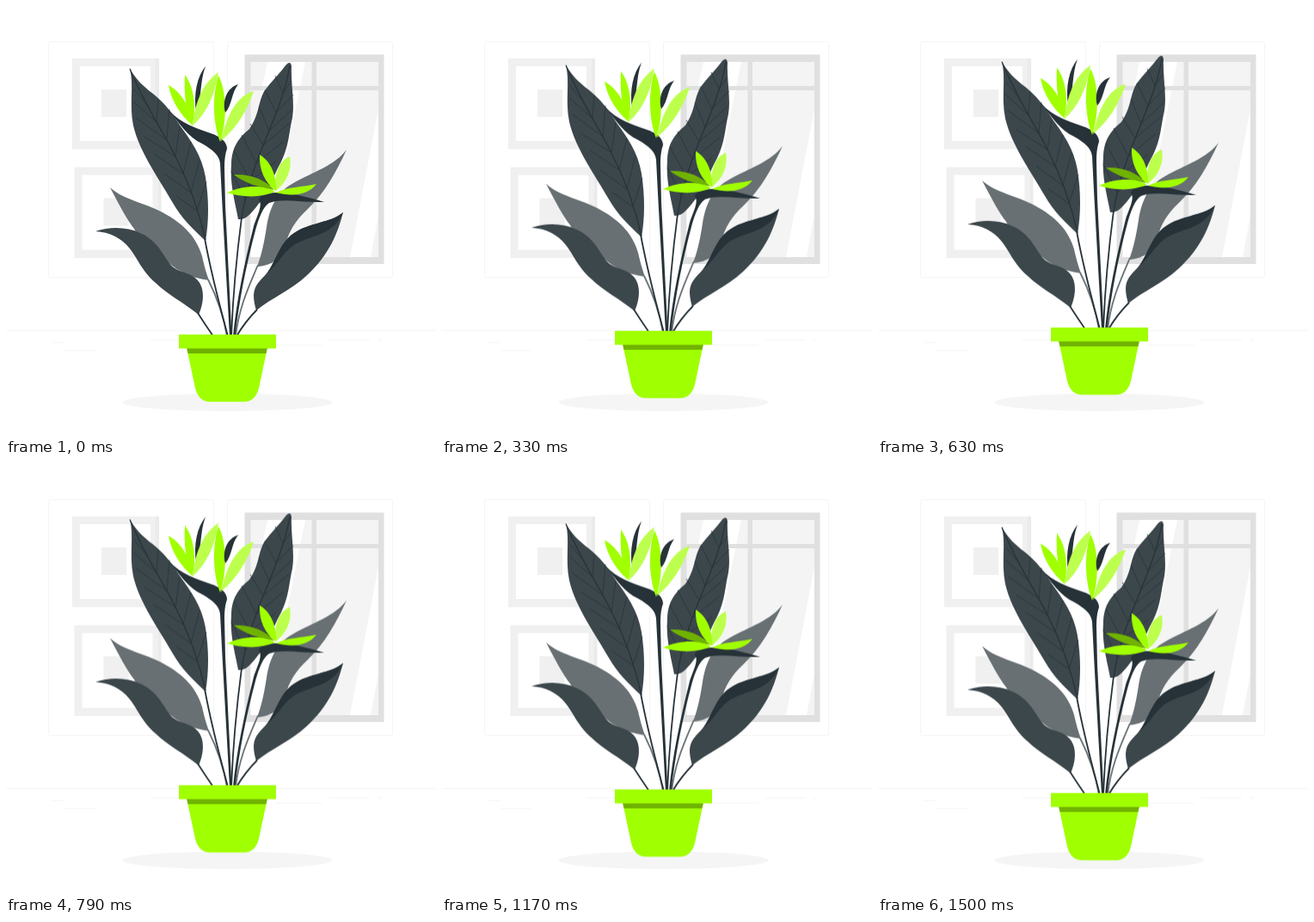
Recreate the animation shown at these times as an HTML page. Size 500x500 px, loop 1.54 s.

```html
<!DOCTYPE html>
<html lang="en">
<head>
<meta charset="utf-8">
<title>Floating plant</title>
<style>
  html, body { margin: 0; width: 100%; height: 100%; overflow: hidden; background: #fff; }
  svg { display: block; width: 100%; height: 100%; }
  .plant { animation: float 1540ms linear -46ms infinite; }
  @keyframes float {
    0%, 100% { transform: translateY(.6px); }
    50% { transform: translateY(-9.4px); }
  }
  .line { fill: none; stroke: #f5f5f5; }
  .pale { fill: #f0f0f0; }
  .leaf { fill: #3c474c; }
  .dark { fill: #263238; }
  .faded { fill: #687073; }
  .lime { fill: #a0ff00; }
  .light { fill: #bdff4d; }
  .shade { fill: #70b200; }
  .stem { fill: none; stroke: #263238; stroke-width: 1.8; }
  .back { stroke: #687073; }
  .vein { fill: none; stroke: #263238; stroke-width: .7; }
</style>
</head>
<body>
<svg viewBox="0 0 500 500">
  <defs>
    <g id="picture">
      <path class="pale" fill-rule="evenodd" d="M0 0H97V105.500H0ZM9 9V96H91V9Z"/>
      <path fill="#ebebeb" d="M97 0H101V105.500H97Z"/>
      <path class="pale" d="M34 36H63V68H34Z"/>
    </g>
  </defs>

  <!-- Room -->
  <g class="line">
    <rect x="49.500" y="41.500" width="192" height="274" rx="2"/>
    <rect x="257.500" y="41.500" width="192" height="274" rx="2"/>
    <path d="M0 377.500H500M53 391.300H68M68 400.800H104M168 388.300H201M313 394.200H368M376 388.300H423M432 388.300H436"/>
  </g>
  <use href="#picture" x="77" y="61"/>
  <use href="#picture" x="79.500" y="187.500"/>
  <path fill="#e0e0e0" d="M277.500 56.500H439.500V300H277.500Z"/>
  <path fill="#f4f4f4" d="M284.500 65H433V292H284.500Z"/>
  <path fill="#fff" d="M304 65H348L302 292H284.500V158ZM433 120V243L424 292H400Z"/>
  <path fill="#e0e0e0" d="M355.500 65H361V292H355.500ZM284.500 93H433V98H284.500Z"/>
  <ellipse cx="257.500" cy="460.800" rx="122" ry="10.200" fill="#f5f5f5"/>

  <g class="plant">
    <!-- Faded leaves -->
    <path class="faded" d="M121 211C136 225 162 229 182 240C208 254 222 270 228 291C230 300 233 311 236 319C213 316 194 306 182 291C168 278 156 274 149 259C141 249 132 232 121 211Z"/>
    <path class="faded" d="M396 167C383 185 357 193 334 206C313 217 306 238 303 257C300 276 297 290 292 303C310 302 321 292 325 279C328 262 338 248 350 237C371 217 384 193 396 167Z"/>
    <path class="stem back" d="M235 318C245 338 253 360 257 384M293 301C282 327 271 350 267 384"/>

    <!-- Tall left leaf -->
    <path class="leaf" d="M144 73C149 92 143 114 148 139C155 170 180 204 194 229C204 247 219 261 232 273C236 250 236 225 232 199C228 174 214 155 203 140C192 122 184 113 171 102C159 93 151 85 144 73Z"/>
    <path class="stem" style="stroke-width: 1.200" d="M144 73C163 119 184 148 197 175C214 208 225 241 232 272"/>
    <path class="stem" d="M231 270C239 314 249 350 258 384"/>
    <path class="vein" d="M165 116l-17-20M175 135l-27-24M187 156l-36-26M197 175l-36-23M206 195l-34-23M215 217l-31-22M222 238l-24-17M175 135l2-27M187 156l3-36M197 175l5-35M206 195l9-37M215 217l10-38M222 238l11-34"/>

    <!-- Tall right leaf -->
    <path class="leaf" d="M326 68Q331 63 332 70C331 92 336 111 333 130C329 147 329 163 320 181C309 201 305 218 293 231C284 243 278 249 270 248C267 231 260 207 262 185C262 164 271 153 283 143C295 126 293 110 301 98C309 87 318 79 326 68Z"/>
    <path class="stem" style="stroke-width: 1.200" d="M330 69C326 98 310 135 299 162C286 194 278 220 274 247"/>
    <path class="stem" d="M274 246C269 284 264 334 262 384"/>
    <path class="vein" d="M322 101l-9-20M314 124l-13-26M306 145l-12-28M299 162l-15-25M291 183l-17-33M284 203l-19-35M278 225l-16-33M322 101l10-14M314 124l20-21M306 145l27-25M299 162l31-26M291 183l32-26M284 203l30-22M278 225l25-19"/>

    <!-- Low leaves -->
    <path class="leaf" d="M104 262C122 256 141 257 156 264C175 272 181 287 190 299C197 310 214 309 222 318C232 328 230 346 224 359C207 345 187 335 174 322C157 307 153 293 143 281C134 270 121 263 104 262Z"/>
    <path class="leaf" d="M392 240C378 252 352 252 335 264C317 276 314 298 303 311C295 320 289 324 288 336C288 344 290 350 291 354C308 340 332 330 349 314C376 290 386 263 392 240Z"/>
    <path class="dark" d="M392 240C378 252 352 252 335 264C317 276 314 298 303 311C315 302 320 290 332 280C350 266 379 270 392 240Z"/>
    <path class="stem" d="M223 357Q232 371 241 384M292 353Q278 367 268 384"/>

    <!-- Pair of blooms -->
    <path class="lime" d="M189 92C200 98 214 113 217 139C204 128 192 111 189 92Z"/>
    <path class="lime" d="M208 80C217 92 222 113 217 138C208 122 207 99 208 80Z"/>
    <path class="dark" d="M232 70C222 82 218 103 221 123C228 108 225 88 232 70Z"/>
    <path class="light" d="M247 77C231 88 220 108 217 139C233 125 243 104 247 77Z"/>
    <path class="dark" d="M189 121C204 137 221 142 238 148C250 152 257 158 257 166C255 172 254 178 254 188L255 232L262.500 384H260L251.500 232L249 183C248 173 240 167 228 160C212 153 203 138 189 121Z"/>
    <path class="lime" d="M247 81C256 97 258 131 249 158C240 136 240 102 247 81Z"/>
    <path class="dark" d="M270 91C257 95 251 110 255 124C263 115 262 101 270 91Z"/>
    <path class="light" d="M288 99C270 104 257 124 250 157C270 140 281 120 288 99Z"/>

    <!-- Low bloom -->
    <path class="dark" d="M370 228C351 222 331 217 314 217C301 217 294 221 294 226C299 231 292 244 288 256C277 300 268 343 264 384H266.500C271 343 279 302 290.500 259C294 247 299 233 306 229C322 223 345 229 370 228Z"/>
    <path class="shade" d="M265 196C284 195 302 202 312 214C295 211 277 206 265 196Z"/>
    <path class="light" d="M330 175C317 180 311 197 314 215C326 205 333 191 330 175Z"/>
    <path class="lime" d="M295 173C306 179 315 195 314 215C301 206 294 190 295 173Z"/>
    <path class="lime" d="M257 217C275 209 298 207 313 216C297 223 275 223 257 217Z"/>
    <path class="lime" d="M361 207C343 211 328 210 314 217C333 222 351 220 361 207Z"/>

    <!-- Pot -->
    <path class="lime" d="M210 397H304L294.500 442Q291 460.300 276 460.300H238Q223 460.300 219.500 442Z"/>
    <path class="shade" d="M210 397H304L302.500 404H211.500Z"/>
    <path class="lime" d="M201 382H314V398.300H201Z"/>
  </g>
</svg>
</body>
</html>
```
